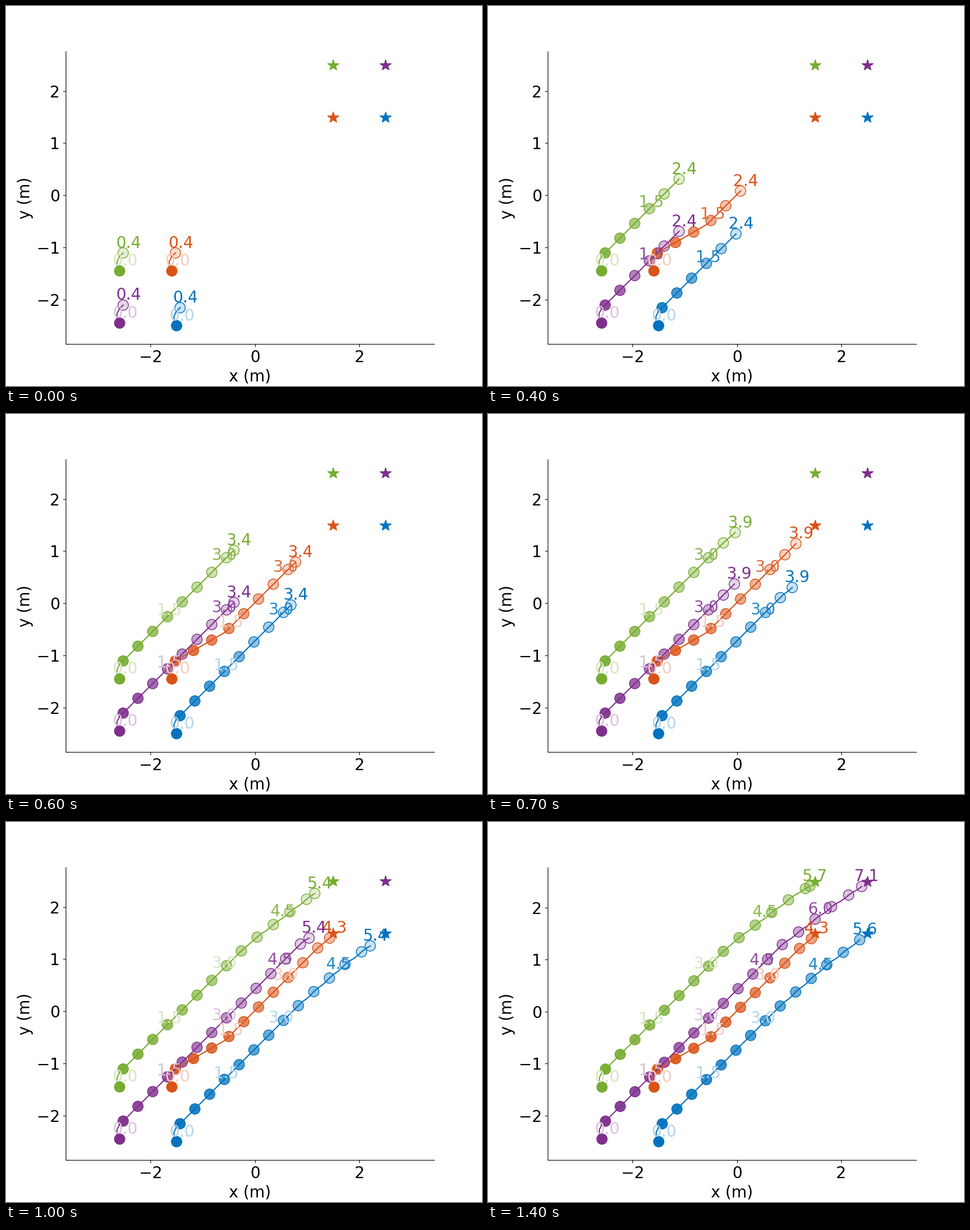
A matplotlib script that plays this animation: 837 px wide and 669 px high, repeating every 2400 ms.

```python
import numpy as np
import matplotlib.pyplot as plt
from matplotlib.animation import FuncAnimation
from matplotlib.colors import to_rgb
from matplotlib.patches import Circle

WIDTH, HEIGHT, DPI = 837, 669, 100
STEPS, FRAMES = 15, 24
RADIUS = 0.1
DIAG = np.sqrt(0.5)

plt.rcParams.update({"font.family": "DejaVu Sans", "font.size": 20})


class Agent:
    """Robot with a swerving start, timed waypoints (t, x, y) and a goal."""

    def __init__(self, color, start, goal, waypoints, wiggle_from):
        self.color, self.goal = color, goal
        x, y = start
        knots = [(0, x, y), (0.1, x - 0.048, y + 0.09), (0.2, x - 0.05, y + 0.183),
                 (0.3, x - 0.004, y + 0.274), (0.4, x + 0.067, y + 0.345)]
        knots += waypoints
        self.times, self.xs, self.ys = np.array(knots).T
        self.end = self.times[-1]
        self.wiggle_from = wiggle_from

    def at(self, t):
        x, y = (np.interp(t, self.times, v) for v in (self.xs, self.ys))
        active = (t > self.wiggle_from) & (t < self.end)
        sway = 0.008 * np.sin(np.pi * t / 0.2 + np.pi / 4) * active
        return x - sway * DIAG, y + sway * DIAG


def diagonal(start, t):
    """Waypoint reached at unit speed along the 45 degree line."""
    run = DIAG * (t - 0.4)
    return t, start[0] + 0.067 + run, start[1] + 0.345 + run


BLUE, ORANGE, PURPLE, GREEN = (-1.5, -2.5), (-1.59, -1.45), (-2.59, -2.45), (-2.59, -1.45)

agents = [
    Agent("#0072BD", BLUE, (2.5, 1.5),
          [diagonal(BLUE, 3.2), (3.6, 0.831, 0.108), (4.0, 1.131, 0.373),
           (4.4, 1.430, 0.634), (4.8, 1.730, 0.896), (5.2, 2.046, 1.136),
           (5.4, 2.204, 1.258), (5.6, 2.357, 1.380)], 3.6),
    Agent("#D95319", ORANGE, (1.5, 1.5),
          [(1.5, -0.568, -0.554), (4.0, 1.202, 1.214), (4.3, 1.430, 1.403)], 9),
    Agent("#7E2F8E", PURPLE, (2.5, 2.5),
          [diagonal(PURPLE, 5.2), (5.4, 1.033, 1.408), (5.6, 1.188, 1.527),
           (6.0, 1.505, 1.773), (6.4, 1.822, 2.013), (6.8, 2.149, 2.237),
           (7.1, 2.395, 2.405)], 5.2),
    Agent("#77AC30", GREEN, (1.5, 2.5),
          [diagonal(GREEN, 3.6), (4.0, 0.042, 1.422), (4.4, 0.357, 1.659),
           (4.8, 0.673, 1.903), (5.2, 0.992, 2.144), (5.4, 1.142, 2.263),
           (5.6, 1.319, 2.362), (5.7, 1.401, 2.413)], 4.0),
]

# The small surplus keeps the pixel size from rounding down.
fig, ax = plt.subplots(figsize=((WIDTH + 0.01) / DPI, (HEIGHT + 0.01) / DPI), dpi=DPI)


def tint(color, amount):
    return tuple(1 - amount * (1 - c) for c in to_rgb(color))


def samples(step, end):
    """Multiples of step before end, then end itself."""
    return np.append(np.arange(0, end - 1e-6, step), end)


def draw_agent(agent, now):
    end = min(now, agent.end)
    color = agent.color
    ax.plot(*agent.goal, "*", ms=15, color=color)
    ax.plot(*agent.at(samples(0.1, end)), color=color, lw=1.5)
    for t in samples(0.4, end):
        fill = (*to_rgb(color), 1 - 0.8 * t / now)
        ax.add_patch(Circle(agent.at(t), RADIUS, fc=fill, ec=color, lw=1))
    for t in samples(1.5, end):
        x, y = agent.at(t)
        strength = 1 if t == end else 0.85 if t / now > 0.6 else 0.3
        ax.text(x + 0.1, y + 0.1, f"{t:.1f}", ha="center", color=tint(color, strength))


def fit_limits(now):
    """Equal scale on both axes with a 5 percent margin around the data."""
    tops = [agent.at(min(now, agent.end))[1] + RADIUS for agent in agents]
    low, high = -2.5 - RADIUS, max(2.5, *tops)
    margin = 0.05 * (high - low)
    ax.set_ylim(low - margin, high + margin)
    box = ax.get_window_extent()
    half = 0.55 * (high - low) * box.width / box.height
    center = (2.5 - 2.59 - RADIUS) / 2
    ax.set_xlim(center - half, center + half)


def update(frame):
    now = 0.4 + 0.5 * min(frame, STEPS - 1)
    ax.clear()
    ax.spines[["top", "right"]].set_visible(False)
    for agent in agents:
        draw_agent(agent, now)
    fit_limits(now)
    ax.set_xticks([-2, 0, 2])
    ax.set_yticks(range(-2, 3))
    ax.set_xlabel("x (m)")
    ax.set_ylabel("y (m)")
    return []


anim = FuncAnimation(fig, update, frames=FRAMES, interval=100, repeat=True,
                     init_func=lambda: [])
plt.show()
```
